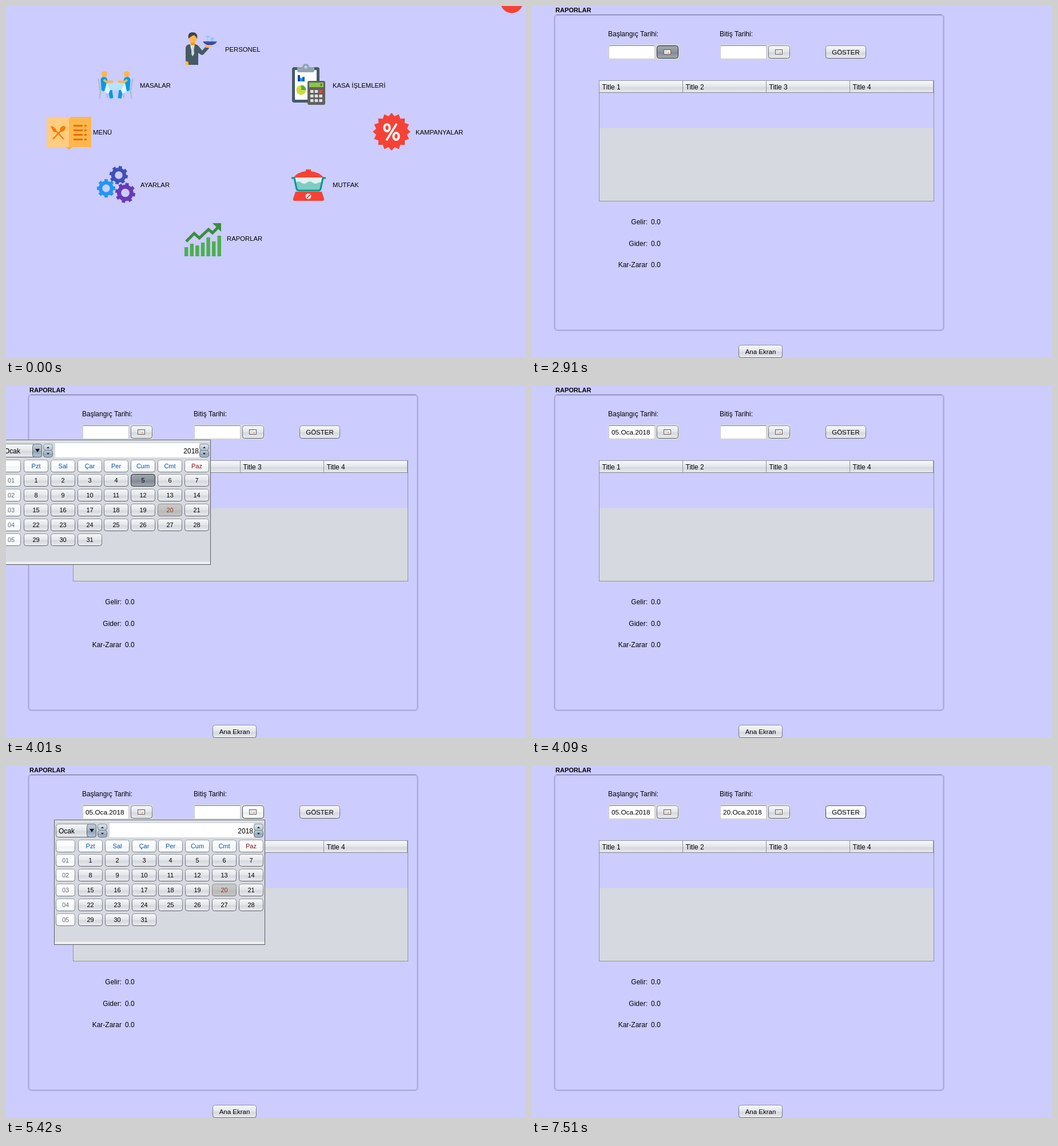
An HTML page with a canvas that plays this animation: 909 by 616 pixels, repeating every 8 s.

```html
<!DOCTYPE html>
<html lang="tr">
<head>
<meta charset="utf-8">
<style>
html, body { margin: 0; width: 100%; height: 100%; overflow: hidden; background: #ccccff; }
canvas { display: block; }
</style>
</head>
<body>
<canvas id="stage" width="909" height="616"></canvas>
<script>
const ctx = document.getElementById('stage').getContext('2d');
const LOOP = 8000;
const LILAC = '#ccccff', GREY = '#d6d9df', RED = '#f44336', SKIN = '#ffb74d', SLATE = '#455a64';

// Four fill colours from top to bottom, then the top and bottom border colours
const SKINS = {
  normal: ['#f8f9fa', '#e3e6ea', '#d5d8dd', '#eaecf0', '#8f9299', '#5d6067'],
  hover: ['#ffffff', '#f5f7f9', '#eaedf0', '#ffffff', '#5d6066', '#303338'],
  pressed: ['#a3a9b1', '#8d939c', '#838992', '#a7adb6', '#22262b', '#33373c'],
  head: ['#ffffff', '#fbfcfd', '#f1f4f7', '#ffffff', '#98a2ab', '#69737c'],
  today: ['#cacaca', '#c2c2c2', '#b9b9b9', '#c6c6c6', '#999999', '#777777'],
  todayHover: ['#e0e0e0', '#d4d4d4', '#cacaca', '#dddddd', '#666666', '#444444'],
  todayPressed: ['#adadad', '#a0a0a0', '#949494', '#b0b0b0', '#222222', '#333333'],
  arrowUp: ['#dfe6ec', '#cdd7e0', '#c1cdd8', '#b9c6d2', '#86919c', '#6b7782'],
  arrow: ['#c3ced9', '#a3b5c6', '#8fa4b8', '#b9c8d6', '#6b7782', '#525e69']
};

function rect(x, y, w, h, color) {
  ctx.fillStyle = color;
  ctx.fillRect(x, y, w, h);
}

function disc(x, y, r, color) {
  ctx.fillStyle = color;
  ctx.beginPath();
  ctx.arc(x, y, r, 0, 7);
  ctx.fill();
}

function fill(path, color) {
  ctx.fillStyle = color;
  ctx.fill(new Path2D(path));
}

function line(path, color, width = 1) {
  ctx.strokeStyle = color;
  ctx.lineWidth = width;
  ctx.stroke(new Path2D(path));
}

function frame(x, y, w, h, color) {
  ctx.strokeStyle = color;
  ctx.lineWidth = 1;
  ctx.strokeRect(x + .5, y + .5, w - 1, h - 1);
}

function text(label, x, y, { size = 12, color = '#000', align = 'left', weight = '' } = {}) {
  ctx.font = `${weight} ${size}px "Liberation Sans", Arial, sans-serif`;
  ctx.textAlign = align;
  ctx.fillStyle = color;
  ctx.fillText(label, x, y);
}

function gradient(y, h, colors, stops) {
  const g = ctx.createLinearGradient(0, y, 0, y + h);
  stops.forEach((stop, i) => g.addColorStop(stop, colors[i]));
  return g;
}

const glossy = (y, h, skin) => gradient(y, h, SKINS[skin], [0, .48, .56, 1]);

function button(x, y, w, h, label, skin = 'normal', style = {}) {
  ctx.beginPath();
  ctx.roundRect(x + .5, y + .5, w - 1, h - 1, 4);
  ctx.fillStyle = glossy(y, h, skin);
  ctx.fill();
  ctx.strokeStyle = gradient(y, h, SKINS[skin].slice(4), [0, 1]);
  ctx.lineWidth = 1;
  ctx.stroke();
  text(label, x + w / 2, y + h / 2 + 4, { size: 11, align: 'center', ...style });
}

/* ---------- main menu ---------- */

function waiter() {
  fill('M314 103V74Q314 67 322 67H331Q336 68 339 73L343 78L350 70L355 74L345 85Q342 87 339 84L336 82V103Z', SLATE);
  fill('M322 67H330L326 87Z', '#ffffff');
  fill('M325 70H328L329 84L326 88L324 84Z', '#cfd8dc');
  rect(323, 63, 7, 6, '#ff9800');
  disc(326.5, 57, 7, SKIN);
  fill('M319 57Q317 46 326 46Q336 46 334 58Q332 52 328 51Q322 54 319 57Z', '#424242');
  fill('M314 96L319 98V103H314Z', SKIN);
  fill('M347 69L357 67L361 69L354 73L349 73Z', SKIN);
  fill('M344 62H369L366 66H347Z', '#3f51b5');
  fill('M347 66H366L361 68H352Z', '#283593');
  fill('M348 52H357L353 57V61H356V62H349V61H352V57Z', '#90caf9');
  fill('M357 55H364L363 62H358Z', '#90caf9');
}

function diners() {
  for (const side of [1, -1]) {
    ctx.save();
    ctx.translate(191.5, 0);
    ctx.scale(side, 1);
    line('M-30 127L-27 146H-14M-26 146L-28 162M-15 147L-14 161', '#b0bec5', 2.5);
    fill('M-26 129Q-25 124 -20 124Q-15 124 -14 130L-12 142H-8Q-6 143 -6 147L-4 161L-10 162L-13 149H-21Q-25 149 -25 143Z', '#039be5');
    disc(-19.5, 119, 5.3, SKIN);
    ctx.restore();
  }
  fill('M176 135H208L211 149L204 154L201 147H182L179 154L172 150Z', '#b3e5fc');
  fill('M176 135L182 147L179 154L172 150ZM208 135L201 147L204 154L211 149Z', '#e1f5fe');
  line('M171 129L176 133L187 132M212 129L207 133L196 132', SKIN, 4);
}

function menuBook() {
  rect(71, 194, 39, 53, '#ffcc80');
  fill('M110 198L114 194H149V247H114L110 251Z', SKIN);
  fill('M105 247H116L110 251Z', '#ffa726');
  line('M82 213L101 233M100 214L82 233', '#f57c00', 2.5);
  fill('M78 211L81 210L88 216L87 221L83 220Z', '#f57c00');
  ctx.fillStyle = '#f57c00';
  ctx.beginPath();
  ctx.ellipse(99, 215, 4, 6, .75, 0, 7);
  ctx.fill();
  for (let y = 208; y < 240; y += 8) {
    rect(118, y, 16, 3, '#ef6c00');
    rect(137, y, 4, 3, '#ef6c00');
  }
}

function gear(x, y, r, color, phase) {
  ctx.save();
  ctx.translate(x, y);
  ctx.rotate(phase);
  for (let i = 0; i < 8; i++) {
    rect(-3, -r, 6, r / 2, color);
    ctx.rotate(Math.PI / 4);
  }
  ctx.restore();
  ctx.strokeStyle = color;
  ctx.lineWidth = r * .4;
  ctx.beginPath();
  ctx.arc(x, y, r * .62, 0, 7);
  ctx.stroke();
}

function risingChart() {
  [422, 416, 419, 414, 405, 412, 402].forEach((top, i) =>
    rect(312 + i * 9.6, top, 6.4, 438 - top, '#4caf50'));
  line('M315 412L329 398L338 406L354 391L361 397L371 387', '#388e3c', 5);
  fill('M361 380H376V395Z', '#388e3c');
}

function clipboard() {
  ctx.fillStyle = SLATE;
  ctx.beginPath();
  ctx.roundRect(500, 107, 48, 62, 4);
  ctx.fill();
  rect(505, 112, 38, 52, '#ffffff');
  disc(524, 107, 6, '#90a4ae');
  fill('M509 107H539V113Q539 116 536 116H512Q509 116 509 113Z', '#90a4ae');
  disc(524, 107, 2.5, LILAC);
  rect(510, 121, 4, 11, '#0d47a1');
  rect(514, 126, 4, 6, '#2196f3');
  rect(518, 124, 4, 8, '#1565c0');
  disc(516, 147, 8.5, '#cddc39');
  fill('M516 147V138.5A8.5 8.5 0 0 1 524.5 147Z', '#4caf50');
  ctx.fillStyle = '#616161';
  ctx.beginPath();
  ctx.roundRect(527, 131, 31, 42, 3);
  ctx.fill();
  rect(530, 134, 25, 8, '#8bc34a');
  rect(550, 136, 2, 4, '#33691e');
  for (let i = 0; i < 9; i++) {
    rect(532 + i % 3 * 7.7, 147 + Math.floor(i / 3) * 8, 5.5, 5, i === 2 ? RED : '#e0e0e0');
  }
}

function discountBadge() {
  ctx.fillStyle = RED;
  ctx.beginPath();
  for (let i = 0; i < 32; i++) {
    const a = i * Math.PI / 16, r = i % 2 ? 27.5 : 33;
    ctx.lineTo(674 + r * Math.sin(a), 220 - r * Math.cos(a));
  }
  ctx.fill();
  ctx.strokeStyle = '#fff';
  ctx.lineWidth = 4;
  for (const [x, y] of [[666, 213], [682, 228]]) {
    ctx.beginPath();
    ctx.ellipse(x, y, 4.7, 6, 0, 0, 7);
    ctx.stroke();
  }
  line('M683 206L665 235', '#fff', 3.5);
}

function cookingPot() {
  fill('M503 300Q509 291 524 289V286H533V289Q548 291 555 300Z', RED);
  fill('M505 301H553L549 322H509Z', '#e0f2f1');
  fill('M506 309Q511 305 516 309T526 309T536 309T546 309L552 308L549 322H509Z', '#80cbc4');
  line('M499 301H504L508 320Q509 323 512 323H546Q549 323 550 320L554 301H559', '#009688', 3);
  fill('M506 325H552L556 337Q557 341 553 341H505Q501 341 502 337Z', RED);
  disc(528.5, 333, 4.8, '#fff');
  line('M526 336L532 330', RED, 2);
}

function mainMenu() {
  disc(884, -7, 19.5, RED);
  waiter();
  diners();
  menuBook();
  gear(197, 296, 16, '#3f51b5', .2);
  gear(175, 319, 16, '#2196f3', 0);
  gear(208.5, 327, 17.5, '#673ab7', .2);
  risingChart();
  clipboard();
  discountBadge();
  cookingPot();
  [['PERSONEL', 383, 80], ['MASALAR', 234, 143], ['KASA İŞLEMLERİ', 571, 143],
   ['MENÜ', 152, 225], ['KAMPANYALAR', 716, 225], ['AYARLAR', 235, 317],
   ['MUTFAK', 571, 317], ['RAPORLAR', 386, 411]
  ].forEach(([label, x, y]) => text(label, x, y, { size: 11.3 }));
}

/* ---------- report screen ---------- */

function groupBox() {
  for (const width of [3, 1]) {
    ctx.strokeStyle = 'rgba(100,100,140,.2)';
    ctx.lineWidth = width;
    ctx.beginPath();
    ctx.roundRect(39.5, 15.5, 680, 552, 5);
    ctx.stroke();
  }
  line('M43 15.5H716', 'rgba(80,80,105,.4)');
  text('RAPORLAR', 41, 11, { size: 11, weight: 'bold' });
}

function dateField(x, label, value, skin) {
  text(label, x, 53);
  rect(x, 67, 124, 27, GREY);
  rect(x + 2, 69, 79, 23, '#ffffff');
  frame(x + 1, 68, 81, 25, '#c6c9cf');
  rect(x + 2, 69, 79, 1, '#8d9096');
  text(value, x + 6, 85, { size: 11.8 });
  button(x + 85, 69, 38, 23, '', skin);
  rect(x + 97, 76, 12, 9, '#f2f2f2');
  frame(x + 97, 76, 13, 9, '#5a5a5a');
  rect(x + 99, 78, 4, 5, '#dcdee2');
  rect(x + 104, 80, 3, 3, '#e2b48c');
}

function table(hoveredColumn) {
  rect(117, 130, 586, 212, GREY);
  rect(118, 152, 584, 61.5, LILAC);
  ctx.fillStyle = glossy(131, 21, 'normal');
  ctx.fillRect(118, 131, 584, 21);
  for (let i = 0; i < 4; i++) {
    const x = 118 + Math.round(i * 146.1);
    if (i === hoveredColumn) rect(x, 141, 145, 10, 'rgba(255,255,255,.55)');
    rect(x + 145, 131, 1, 21, '#8e929a');
    text('Title ' + (i + 1), x + 4.5, 146);
  }
  rect(118, 151, 584, 1, '#80848c');
  frame(117, 130, 586, 212, '#90949c');
}

function spinner(x) {
  button(x, 101, 17, 12, '', 'arrowUp');
  button(x, 112, 17, 13, '', 'arrow');
  fill(`M${x + 6} 109h5l-2.5 -3ZM${x + 6} 117h5l-2.5 3Z`, '#20252c');
}

function calendar(left, activeDay, activeState) {
  ctx.save();
  ctx.translate(left, 0);
  rect(0, 94, 369, 219, GREY);
  rect(1, 95, 367, 2, '#e6e8ec');
  rect(1, 307.5, 367, 4, '#f0f0f0');
  frame(0, 94, 369, 219, '#5c5f64');
  button(3, 101, 71, 24, '');
  button(57, 101, 17, 24, '', 'arrow');
  fill('M62 110H70L66 116Z', '#101418');
  text('Ocak', 8, 118);
  spinner(76);
  rect(97, 100, 252, 25, '#ffffff');
  text('2018', 348, 118, { align: 'right' });
  spinner(349);

  const rowY = row => Math.round(128.6 + row * 25.8);
  const columnX = column => Math.round(42 + column * 46.8);
  for (let row = 0; row < 6; row++) {
    button(3, rowY(row), 34, 22, row ? '0' + row : '', 'head', { color: '#666c72' });
  }
  ['Pzt', 'Sal', 'Çar', 'Per', 'Cum', 'Cmt', 'Paz'].forEach((name, i) =>
    button(columnX(i), rowY(0), 43, 22, name, 'head', { color: i < 6 ? '#0755a0' : '#8c1010' }));
  for (let day = 1; day <= 31; day++) {
    const today = day === 20, state = day === activeDay ? activeState : 'normal';
    const skin = !today ? state : { normal: 'today', hover: 'todayHover', pressed: 'todayPressed' }[state];
    const color = !today ? '#000' : state === 'pressed' ? '#b00c0c' : '#8a3a2a';
    button(columnX((day - 1) % 7), rowY(Math.ceil(day / 7)), 43, 22, day, skin, { color });
  }
  ctx.restore();
}

function reports(t) {
  const during = (from, to) => t >= from && t < to;
  const state = (hover, press, release, end) =>
    during(press, release) ? 'pressed' : during(hover, end) ? 'hover' : 'normal';

  groupBox();
  dateField(133, 'Başlangıç Tarihi:', t >= 4090 ? '05.Oca.2018' : '', state(2450, 2910, 3080, 3150));
  dateField(328, 'Bitiş Tarihi:', t >= 6820 ? '20.Oca.2018' : '', state(4620, 5260, 5420, 5580));
  button(513, 69, 71, 23, 'GÖSTER', t >= 7510 ? 'hover' : 'normal', { size: 11.5 });
  table(during(4250, 4470) ? 1 : during(7280, 7430) ? 2 : -1);
  [['Gelir:', 382], ['Gider:', 420], ['Kar-Zarar', 457]].forEach(([label, y]) => {
    text(label, 202, y, { align: 'right' });
    text('0.0', 208, y);
  });
  button(361, 593, 77, 23, 'Ana Ekran', 'normal', { size: 11.5 });

  if (during(3080, 4090)) calendar(-11, 5, state(3460, 4010, 4090, 4090));
  if (during(5420, 6820)) {
    const day = during(5660, 5740) ? 7 : during(5810, 6040) ? 14 : t >= 6040 ? 20 : 0;
    calendar(84, day, t >= 6660 ? 'pressed' : 'hover');
  }
}

function draw(now) {
  const t = now % LOOP;
  rect(0, 0, 909, 616, LILAC);
  if (t < 1440) mainMenu();
  else reports(t);
  requestAnimationFrame(draw);
}
requestAnimationFrame(draw);
</script>
</body>
</html>
```
